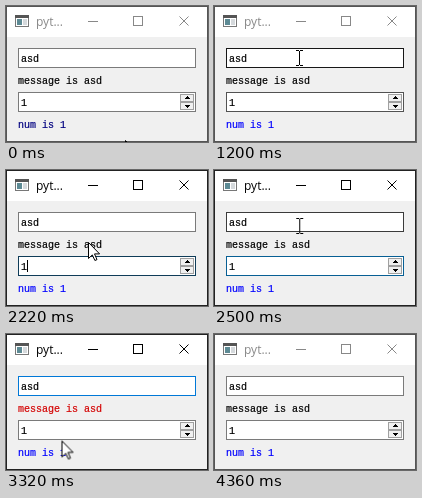
Animation of 202x136 px, one loop 4560 ms. Source, as an HTML page:

```html
<!DOCTYPE html>
<html lang="en">
<head>
<meta charset="utf-8">
<title>Form demo</title>
<style>
html, body { margin: 0; width: 100%; height: 100%; overflow: hidden; background: #f0f0f0; }
svg { display: block; width: 100vw; height: 100vh; }
.crisp { shape-rendering: crispEdges; }
.mono { font: 10px "Liberation Mono", "DejaVu Sans Mono", monospace; white-space: pre; fill: currentColor; stroke: currentColor; stroke-width: .2px; }
.title { font: 12px "Open Sans", "Noto Sans", sans-serif; fill: currentColor; }
.field { fill: #fff; stroke: #7a7a7a; }

/* All parts share one 4560 ms loop. */
.chrome, .message, .num, .caret, .pointer, .beam, .arrow { animation: 4560ms step-end infinite; }
.chrome { animation-name: activate; }
.message { animation-name: message; }
.num { animation-name: num; }
.line-caret { animation-name: line-caret; }
.spin-caret { animation-name: spin-caret; }
.pointer { animation-name: move, shape; }
.beam { animation: none; opacity: var(--beam); }
.arrow { animation: none; opacity: calc(1 - var(--beam)); }
.line { animation: line 4560ms linear infinite; }
.spin { animation: spin 4560ms linear infinite; }

@keyframes activate {
  0%, 92.98%, 100% { color: #888; --edge: #555; }
  27.85% { color: #000; --edge: #222; }
}
@keyframes message {
  0%, 42.1%, 92.98%, 100% { color: #000; }
  27.85%, 55.92% { color: #d40000; }
}
/* Pink while the spin box is hovered, blue after leaving it. */
@keyframes num {
  0% { color: #000080; }
  5.7%, 15.35%, 40.65%, 60.3%, 74.34% { color: #ffc0cb; }
  8.55%, 19.46%, 47.36%, 61.62%, 78.79%, 100% { color: #00f; }
}
@keyframes line-caret {
  0%, 39.47%, 67.54%, 89.91%, 100% { opacity: 0; }
  27.85%, 55.92%, 79.16% { opacity: 1; }
}
@keyframes spin-caret {
  0%, 53.72%, 100% { opacity: 0; }
  42.1% { opacity: 1; }
}
/* Borders fade between rest, hover and focus. */
@keyframes line {
  0%, 24.9%, 48.68%, 53%, 92.98%, 100% { stroke: #7a7a7a; }
  26.31%, 27.85%, 55.92% { stroke: #171717; }
  34.87%, 42.1%, 68%, 92.97% { stroke: #0078d7; }
}
@keyframes spin {
  0%, 5.7%, 15.3%, 30.92%, 40.6%, 72.4%, 74.34%, 89.91%, 100% { stroke: #7a7a7a; }
  8.55% { stroke: #3a3a3a; }
  15.35%, 19.46%, 42.1%, 77.41%, 78.79% { stroke: #171717; }
  55.92% { stroke: #06659f; }
  61.62% { stroke: #303030; }
}
@keyframes move {
  0% { transform: translate(119px, 134px); animation-timing-function: steps(4); }
  5.7% { transform: translate(84px, 99px); animation-timing-function: steps(2); }
  8.55% { transform: translate(80px, 109px); }
  15.35% { transform: translate(77px, 103px); animation-timing-function: steps(8); }
  26.31% { transform: translate(85px, 52px); }
  33.42% { transform: translate(85px, 52px); animation-timing-function: steps(6); }
  42.1% { transform: translate(78px, 97px); }
  44.73% { transform: translate(78px, 97px); animation-timing-function: steps(3); }
  48.68% { transform: translate(82px, 72px); animation-timing-function: steps(5); }
  55.92% { transform: translate(86px, 52px); }
  57.67% { transform: translate(86px, 52px); animation-timing-function: steps(3); }
  61.62% { transform: translate(74px, 112px); animation-timing-function: steps(6); }
  70.17% { transform: translate(57px, 115px); }
  71.27% { transform: translate(57px, 115px); animation-timing-function: steps(2); }
  74.34% { transform: translate(54px, 98px); }
  76.1% { transform: translate(54px, 98px); animation-timing-function: steps(6); }
  84.21%, 100% { transform: translate(50px, 140px); }
}
/* Text beam over the fields, arrow elsewhere. */
@keyframes shape {
  0%, 8.55%, 19.46%, 36.3%, 47.36%, 58.98%, 61.62%, 78.79%, 100% { --beam: 0; }
  5.7%, 15.35%, 24.95%, 40.65%, 53.02%, 60.3%, 74.34% { --beam: 1; }
}
</style>
</head>
<body>
<svg viewBox="0 0 202 136">
  <rect width="202" height="136" fill="#f0f0f0"/>
  <rect width="202" height="31" fill="#fff"/>

  <g class="chrome">
    <g class="crisp">
      <rect x="9.5" y="9.5" width="13" height="11" fill="#fff" stroke="#777"/>
      <rect x="9" y="9" width="14" height="3" fill="#555"/>
      <rect x="11" y="13" width="5" height="6" fill="#5d8a94"/>
      <rect x="17" y="13" width="4" height="6" fill="#d5d9dc"/>
    </g>
    <text class="title" x="30" y="20">pyt...</text>
    <g fill="none" stroke="currentColor">
      <path class="crisp" d="M82 15.5h10M127.5 10.5h9v9h-9z"/>
      <path d="M173.5 10.5l9 9m0-9l-9 9"/>
    </g>
    <rect class="crisp" x=".5" y=".5" width="201" height="135" fill="none" style="stroke: var(--edge)"/>
  </g>

  <g class="crisp">
    <rect class="field line" x="12.5" y="42.5" width="177" height="19"/>
    <rect class="field spin" x="12.5" y="86.5" width="177" height="19"/>
    <path d="M174.5 88.5h13v7h-13zM174.5 96.5h13v7h-13z" fill="#f0f0f0" stroke="#a0a0a0"/>
    <path d="M181 90h1v1h1v1h1v1h-5v-1h1v-1h1zM179 99h5v1h-1v1h-1v1h-1v-1h-1v-1h-1z"/>
  </g>

  <text class="mono" x="15" y="56">asd</text>
  <text class="mono message" x="12" y="78">message is asd</text>
  <text class="mono" x="15" y="100">1</text>
  <text class="mono num" x="12" y="122">num is 1</text>
  <rect class="caret line-caret" x="33" y="46" width="1" height="12"/>
  <rect class="caret spin-caret" x="21" y="90" width="1" height="12"/>

  <g class="pointer">
    <path class="arrow" d="M.5 .5V16.5L4.3 12.9 6.9 18.5 9 17.6 6.5 11.9H11.6Z" fill="#fff" stroke="#000"/>
    <path class="beam crisp" d="M-3-7.5H0M1-7.5H4M.5-7V7M-3 7.5H0M1 7.5H4" fill="none" stroke="#000"/>
  </g>
</svg>
</body>
</html>
```
